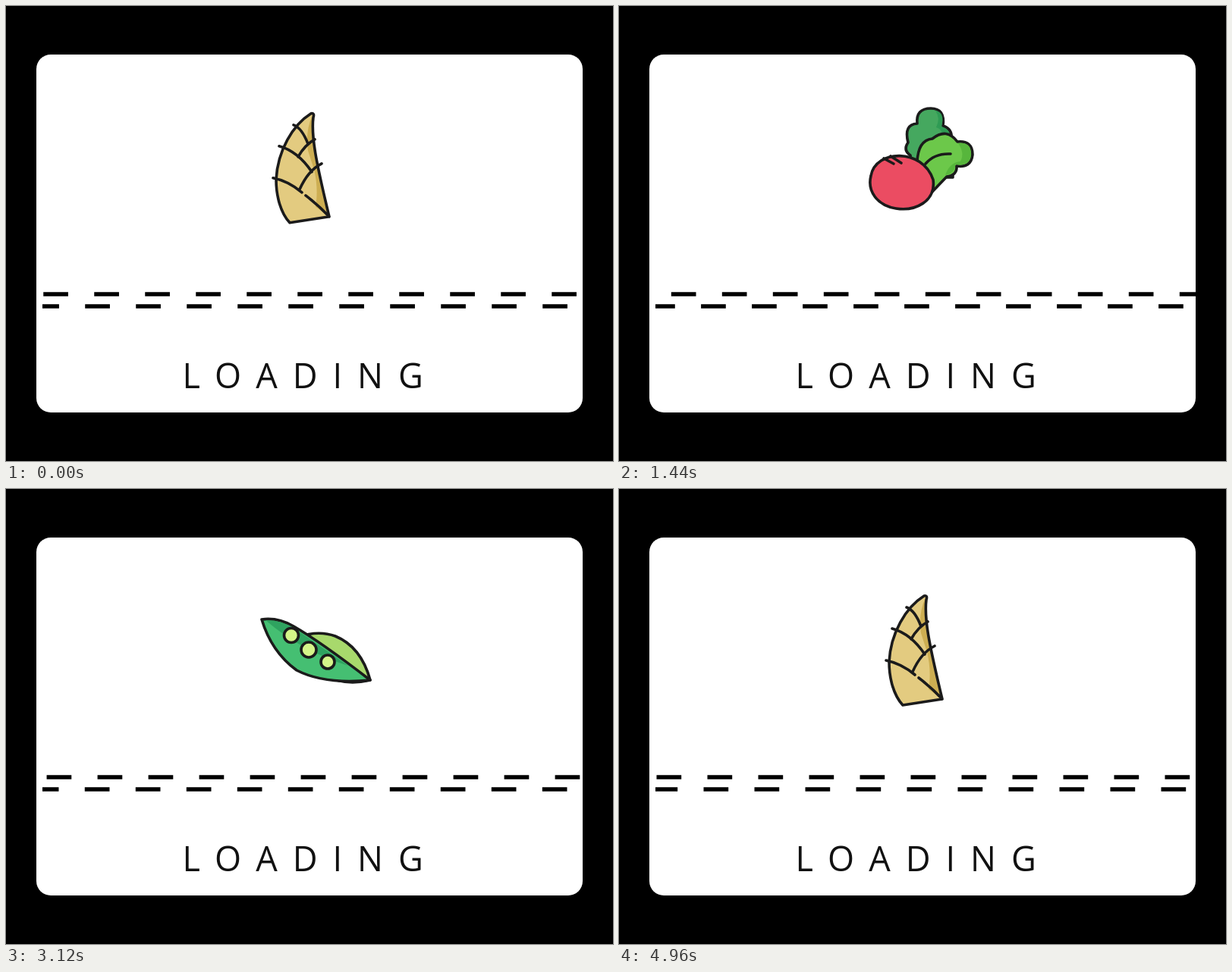
An HTML page that plays this animation: 800 px wide and 600 px high, repeating every 4.98 s.

```html
<!DOCTYPE html>
<html lang="en">
<head>
<meta charset="utf-8">
<title>Loading</title>
<style>
  html, body { margin: 0; width: 100%; height: 100%; overflow: hidden; background: #000; }
  svg { display: block; width: 100vw; height: 100vh; }
  .ink, .ink path, .ink circle { stroke: #1b1b1b; stroke-width: 3.6; stroke-linecap: round; stroke-linejoin: round; }
  .ink .flat { stroke: none; }
  .ink .line { fill: none; }
  .dash { stroke: #000; stroke-width: 5.6; stroke-dasharray: 32.7 34.3; }
  text { font: 45px "Open Sans", "Noto Sans", sans-serif; letter-spacing: 20px; fill: #111; }
</style>
</head>
<body>
<svg viewBox="0 0 800 600">
  <defs><clipPath id="above"><rect x="40" y="64" width="720" height="316"/></clipPath></defs>
  <rect x="40" y="64" width="720" height="472" rx="19" fill="#fff"/>
  <g clip-path="url(#above)"><g id="stack" class="ink">

    <g id="shoot">
      <path class="flat" fill="#e3cb80" d="M402 141Q407 140 405 146C402 170 408 202 426 277L374 285C362 272 356 250 356 228C358 190 378 156 402 141Z"/>
      <path class="flat" fill="#cdae52" d="M404 143C402 170 408 202 426 277L408 264Q412 240 406 215L398 190Q394 165 404 143Z"/>
      <path class="line" d="M402 141Q407 140 405 146C402 170 408 202 426 277L374 285C362 272 356 250 356 228C358 190 378 156 402 141ZM379 156Q390 160 398 181M407 175Q394 182 385 198M360 184Q385 191 403 218M416 207Q398 216 387 241M352 226Q372 230 390 245M395 249Q412 262 426 277"/>
    </g>

    <g id="squash">
      <circle cx="327" cy="377" r="5" fill="#efdf9a"/>
      <path fill="#42c07b" d="M430 300Q445 284 460 292Q469 306 450 340C430 385 380 420 338 397Q322 384 333 367C365 352 400 340 430 300Z"/>
      <path class="flat" fill="#8ed2a6" d="M430 301Q440 291 449 292Q434 310 425 327C400 355 365 362 337 370C370 355 405 340 430 301Z"/>
      <path class="line" d="M450 292Q440 325 415 355Q385 380 340 386M458 293Q455 330 428 365"/>
      <path class="line" d="M456 290L463 280" style="stroke-width:12"/>
      <path class="line" d="M456 290L463 280" style="stroke:#3fc380;stroke-width:5"/>
    </g>

    <g id="greens">
      <path fill="#45a85f" d="M384 353Q374 346 381 336Q375 312 393 311Q391 291 411 291Q430 291 427 314Q440 318 438 332L440 382H388Z"/>
      <path class="flat" fill="#2f9b54" d="M417 294Q430 296 425 315Q438 319 436 332L425 330Q428 319 418 316Q424 304 417 294Z"/>
      <path fill="#6cc84a" d="M393 362Q394 333 413 331Q432 316 446 335Q466 333 466 352Q464 370 445 367Q446 379 432 381L408 406Z"/>
      <path class="flat" fill="#57b63c" d="M447 337Q464 335 464 352Q462 368 443 365Q443 377 430 379Q436 362 450 361Q456 350 447 337Z"/>
      <path class="line" d="M404 364Q416 350 437 351"/>
      <path fill="#eb4c62" d="M332 380C338 345 400 343 414 385C418 414 390 427 365 423C340 419 327 400 332 380Z"/>
      <path class="line" d="M349 357L362 364M358 354L372 363"/>
    </g>

    <g id="eggplant">
      <path fill="#c370db" d="M397 262C385 276 375 291 350 297C330 303 320 317 324 333C328 352 346 363 365 358C400 350 439 312 443 272L420 258Z"/>
      <path class="flat" fill="#a053b8" d="M437 282C434 311 397 350 364 356C347 360 332 350 327 338C347 348 372 344 393 329C414 313 420 298 422 283Z"/>
      <path class="line" d="M371 335Q392 330 403 317M407 310v.1"/>
      <path fill="#82de6e" d="M396 259Q409 256 411 252Q418 246 426 249Q431 240 429 226Q431 219 437 221Q442 223 441 230Q440 242 435 253Q443 259 444 270Q444 279 438 283Q433 279 431 274Q425 283 417 282Q414 276 413 270Q402 269 396 259Z"/>
      <path class="flat" fill="#6cc25a" d="M437 224Q441 225 439 232Q438 245 432 254Q442 260 442 271Q441 279 438 280Q434 275 431 270Q425 279 419 280Q430 266 425 252Q435 238 437 224Z"/>
    </g>

    <g id="peas">
      <path fill="#a8d96c" d="M385 371Q412 362 434 370Q468 384 480 428Q430 440 396 402Z"/>
      <path fill="#45bf72" d="M337 348Q358 345 379 357Q414 377 480 428Q420 434 383 415Q350 391 337 348Z"/>
      <path class="flat" fill="#2fa360" d="M342 349Q362 348 382 361L451 409Q390 390 342 349Z"/>
      <g fill="#d4f589"><circle cx="376" cy="369" r="9.5"/><circle cx="399" cy="388" r="10"/><circle cx="424" cy="404" r="9"/></g>
    </g>

    <g id="tomato">
      <path class="flat" fill="#ff5a55" d="M323 273Q311 258 312 238C314 206 343 196 364 196C390 196 412 204 418 220L392 287Q370 297 332 283Z"/>
      <path class="flat" fill="#f04648" d="M393 200Q412 205 418 220L392 287Q370 297 336 283Q366 284 382 262Q408 232 393 200Z"/>
      <path class="line" d="M323 273Q311 258 312 238C314 206 343 196 364 196C390 196 412 204 418 220M332 283Q352 294 377 292Q387 291 393 287M331 234Q324 248 333 262M333 222v.1"/>
      <path fill="#57a83f" d="M343 207Q351 199 362 200Q362 188 368 183Q375 181 376 187Q370 194 371 201Q385 199 391 207L382 209L389 219L376 218L368 227L360 218L347 220L353 210Z"/>
      <path fill="#f83444" d="M424 221Q440 215 455 220Q474 230 473 256C472 285 450 302 423 302C395 302 374 285 374 258Q374 235 390 222Q408 214 424 221Z"/>
      <g id="half">
        <path fill="#ff8c86" d="M419 230C395 229 386 243 387 260C388 280 402 291 419 290V271Q407 268 407 259Q409 249 419 247Z"/>
        <path class="line" style="stroke:#ffe5dc;stroke-width:3" d="M409 237L412 243M398 247L404 251M393 259L400 260M398 274L404 269M410 282L413 276"/>
      </g>
      <use href="#half" transform="matrix(-1 0 0 1 848 0)"/>
    </g>
  </g></g>

  <line id="upper" class="dash" x1="48" x2="760" y1="380" y2="380"/>
  <line id="lower" class="dash" x1="48" x2="760" y1="396" y2="396"/>
  <text x="232.6" y="503.5">LOADING</text>
</svg>
<script>
const LOOP = 4980, TRAVEL = 272, SWAP = 330;
const byId = id => document.getElementById(id);
const clamp = v => Math.max(0, Math.min(1, v));

// Each swap sinks one vegetable below the road while the next one rises.
const swaps = [0, 859, 1721, 2580, 3440, 4307];
// lift: how far below its peak each drawing was laid out
const items = [
  ["shoot", 0], ["squash", 116], ["greens", 156],
  ["eggplant", 76], ["peas", 176], ["tomato", 27]
].map(([id, lift]) => ({ node: byId(id), lift }));

// Road marks: distance travelled to the left at each moment.
const moments = [0, 1000, 1960, 2700, 3660, 4340, 4960];
const rows = [
  { node: byId("upper"), start: 49.5, way: [0, 252, 536.5, 745, 1023, 1191, 1340] },
  { node: byId("lower"), start: 37.5, way: [0, 273, 546, 752, 1025, 1232, 1400] }
];

function along(way, t) {
  let i = 0;
  while (i < moments.length - 2 && t > moments[i + 1]) i++;
  const p = clamp((t - moments[i]) / (moments[i + 1] - moments[i]));
  return way[i] + p * (way[i + 1] - way[i]);
}

function draw(t) {
  const p = swaps.map(s => clamp((t - s) / SWAP));
  items.forEach(({ node, lift }, i) => {
    const sunk = i ? 1 - p[i - 1] + p[i] : p[0] - p[5];
    node.setAttribute("transform", `translate(0 ${(sunk * TRAVEL - lift).toFixed(2)})`);
  });
  const stack = byId("stack"), shoot = items[0].node;
  if (t > LOOP / 2) {
    if (stack.lastElementChild !== shoot) stack.append(shoot);
  } else if (stack.firstElementChild !== shoot) stack.prepend(shoot);
  for (const { node, start, way } of rows)
    node.setAttribute("stroke-dashoffset", (48 - start + along(way, t)).toFixed(2));
}

const began = performance.now();
function tick() {
  draw((performance.now() - began) % LOOP);
  requestAnimationFrame(tick);
}
tick();
</script>
</body>
</html>
```
